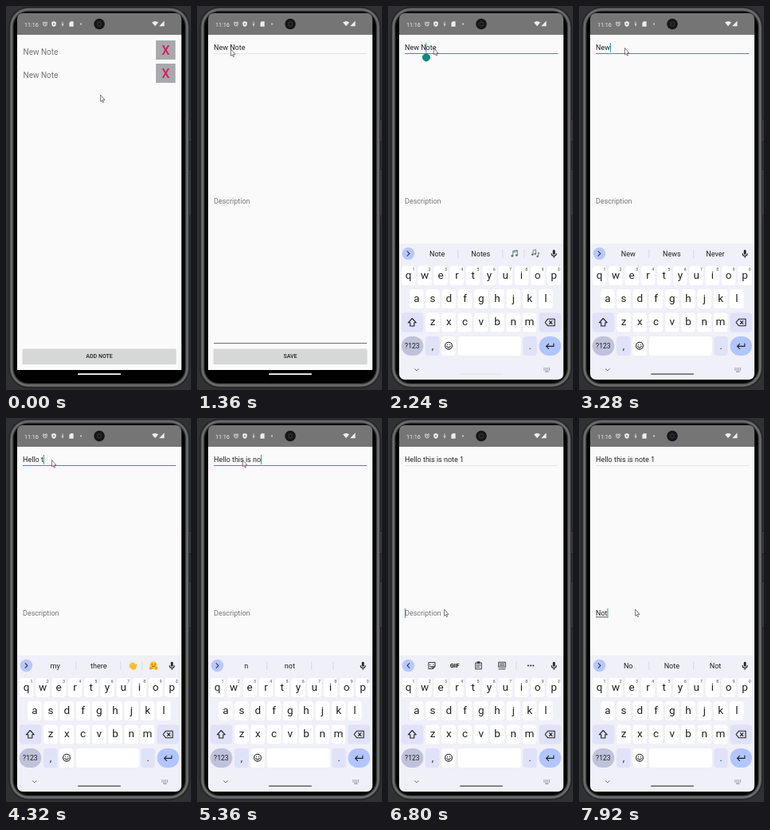
An HTML page with a canvas that plays this animation: 232 by 480 pixels, repeating every 8 s.

```html
<!DOCTYPE html>
<html lang="en">
<head>
<meta charset="utf-8">
<title>Notes app</title>
<style>
  html, body { margin: 0; width: 100%; height: 100%; overflow: hidden; background: #303135; }
  canvas { display: block; width: 232px; height: 480px; }
</style>
</head>
<body>
<canvas id="stage"></canvas>
<script>
const LOOP = 8000, STEP = 80;
const TEAL = '#0c8a7e', LINE_TEAL = '#2c9f94', INK = '#202124', SOFT = '#dfe2f8', PANEL = '#eff0f8';
const canvas = document.getElementById('stage');
const ctx = canvas.getContext('2d');
const ratio = window.devicePixelRatio || 1;
canvas.width = 232 * ratio;
canvas.height = 480 * ratio;

// ---- Timelines ----
const MUSIC = ['Note', 'Notes', 'notes', 'beamed'];
const edits = [
  // time, field, text, suggestions (none = toolbar)
  [0, 'title', 'New Note', MUSIC],
  [2720, 'title', 'New Not', ['Not', 'Note', 'Notes']],
  [2800, 'title', 'New No', ['No', 'Not', 'Note']],
  [2880, 'title', 'New N', ['N', 'Not', 'No']],
  [2960, 'title', 'New ', ['Year', 'York', 'one']],
  [3040, 'title', 'New', ['New', 'News', 'Never']],
  [3440, 'title', 'Ne', ['Ne', 'New', 'Need']],
  [3520, 'title', 'N', ['N', 'No', 'Not']],
  [3920, 'title', '', null],
  [4000, 'title', 'He', ['He', 'Hey', 'Her']],
  [4160, 'title', 'Hell', ['Hell', 'Hello', 'Help']],
  [4240, 'title', 'Hello', ['Hello', 'Hello', 'wave', 'hug']],
  [4320, 'title', 'Hello t', ['my', 'there', 'wave', 'hug']],
  [4400, 'title', 'Hello th', ['th', 'there', 'the']],
  [4480, 'title', 'Hello thi', ['thi', 'this', 'thing']],
  [4800, 'title', 'Hello this', ['this', 'thus', 'thistle']],
  [5040, 'title', 'Hello this i', ['I', 'is', 'it']],
  [5120, 'title', 'Hello this is', ['is', 'isn\'t', 'island']],
  [5360, 'title', 'Hello this is no', ['n', 'not', '', '']],
  [5520, 'title', 'Hello this is not', ['not', 'note', 'nothing']],
  [5600, 'title', 'Hello this is note', ['note', 'notes', 'noted']],
  [5680, 'title', 'Hello this is note ', ['that', 'to', 'for']],
  [5920, 'title', 'Hello this is note 1', ['1', '1st', '10']],
  [6640, 'body', '', null],
  [7760, 'body', 'N', ['N', 'No', 'Not']],
  [7840, 'body', 'No', ['No', 'Not', 'Now']],
  [7920, 'body', 'Not', ['No', 'Note', 'Not']]
];
const pointerMoves = [
  // start, end, target x, target y
  [0, 0, 118, 111],
  [0, 480, 42, 54],
  [1440, 1600, 49, 53],
  [1920, 2240, 57, 52.5],
  [6240, 6720, 70, 239]
];
const within = (t, from, to) => t >= from && t < to;
const progress = (t, from, to) => Math.min(1, Math.max(0, (t - from) / (to - from || 1)));
const smooth = p => p * p * (3 - 2 * p);

// ---- Drawing helpers ----
function rect(x, y, w, h, color, r = 0) {
  ctx.fillStyle = color;
  ctx.beginPath();
  ctx.roundRect(x, y, w, h, r);
  ctx.fill();
}
function disc(x, y, r, color) {
  ctx.fillStyle = color;
  ctx.beginPath();
  ctx.arc(x, y, r, 0, 7);
  ctx.fill();
}
function label(text, x, y, size, color, align = 'left', weight = 400) {
  ctx.font = `${weight} ${size}px Roboto, sans-serif`;
  ctx.textAlign = align;
  ctx.fillStyle = color;
  ctx.fillText(text, x, y);
}
// Path data is relative to (x, y).
function icon(d, x, y, { stroke, fill, width = 1 }) {
  const path = new Path2D(d);
  ctx.save();
  ctx.translate(x, y);
  ctx.lineWidth = width;
  ctx.lineCap = ctx.lineJoin = 'round';
  if (fill) { ctx.fillStyle = fill; ctx.fill(path); }
  if (stroke) { ctx.strokeStyle = stroke; ctx.stroke(path); }
  ctx.restore();
}
function textWidth(text, size) {
  ctx.font = `400 ${size}px Roboto, sans-serif`;
  return ctx.measureText(text).width;
}
const ring = r => `M${-r} 0a${r} ${r} 0 1 0 ${2 * r} 0a${r} ${r} 0 1 0 ${-2 * r} 0`;

// ---- Phone ----
function drawPhone() {
  rect(0, 0, 232, 480, '#303135');
  [[141, 29], [204, 59]].forEach(([y, h]) => {
    rect(229, y, 3, h, '#1c1d1e', 1);
    rect(230.2, y + 1, 1, h - 2, '#77797b');
  });
  // Nested outlines from the outer edge of the rim to the glass.
  const rim = ['#1b1c1d', '#3c3d3e', '#5b5c5d', '#737475', '#666768', '#4a4b4c', '#1e1f20', '#030303'];
  rim.forEach((color, i) => {
    const inset = 3.5 + i * .9;
    rect(inset, inset - 2.5, 234 - 2 * inset, 483.5 - 2 * inset, color, 25 - i);
  });
}
function drawStatusBar() {
  const white = '#ededed';
  rect(14, 9, 206, 27, '#757575');
  label('11:16', 23, 25.5, 7.2, white);
  icon(ring(2.3) + 'M0 -1.2V0L.8 .6M-2.9 -1.8L-1.8 -2.8M2.9 -1.8L1.8 -2.8', 49, 22.7, { stroke: white, width: .8 });
  icon('M0 -3.4L2.8 -2.3V.2Q2.8 2.4 0 3.5Q-2.8 2.4 -2.8 .2V-2.3Z', 60, 22.5, { fill: white });
  disc(60, 22.5, 1, '#757575');
  icon('M0 -2.6V2.6M-1.2 .2L0 1.4L1.2 .2', 71, 22.5, { stroke: white, width: .8 });
  icon('M-1 -3.2H2.6V3.2H-2.6V-1.6Z', 82, 22.5, { fill: white });
  disc(94, 22.5, .9, white);
  icon('M-4 -1.6Q0 -4.6 4 -1.6L0 3.3Z', 187, 22, { fill: white });
  icon('M3 -3.4V3.2H-3.4Z', 195.5, 22, { fill: white });
  disc(117, 22.5, 6.8, '#151617');
  disc(117, 22.5, 3.2, '#2b2d31');
  disc(117, 22.5, 1.6, '#101114');
}
const drawNavPill = color => rect(90, 459.2, 54, 1.9, color, 1);
function drawButton(text) {
  rect(20.5, 428.5, 193, 19.5, '#d6d7d7', 1.5);
  label(text, 117, 440, 7, INK, 'center', 500);
}

// ---- App screens ----
function drawList() {
  [43, 72].forEach(y => {
    label('New Note', 21.5, y + 18, 10, '#757575');
    rect(188, y, 24.5, 24, '#a8a9ac');
    label('X', 200.3, y + 18, 16, '#d81b60', 'center', 500);
  });
  drawButton('ADD NOTE');
}
function drawCaret(x, y) {
  rect(x, y, 1, 12, LINE_TEAL);
}
function drawEditor(t, field, text) {
  const title = field === 'title' ? text : 'Hello this is note 1';
  const titleFocus = t >= 1760 && field === 'title';
  label(title, 21, 55, 9, INK);
  rect(21, 59, 192, titleFocus ? 1 : .8, titleFocus ? LINE_TEAL : '#dedede');
  if (within(t, 2000, 2640)) {
    drawCaret(47.3, 46);
    icon('M0 -5.6L3.8 -2.8A4.9 4.9 0 1 1 -3.8 -2.8Z', 48, 64, { fill: TEAL });
  } else if (titleFocus && t >= 2640) {
    drawCaret(21 + textWidth(title, 9), 46);
  }
  if (field === 'body' && text) {
    const width = textWidth(text, 9);
    label(text, 21, 247, 9, INK);
    rect(21, 248.5, width, .7, INK);
    drawCaret(21 + width, 238);
  } else {
    label('Description', 21, 247, 9, '#757575');
    if (field === 'body' && t < 7520) drawCaret(21, 238);
  }
  rect(21, 421, 192, 1, '#707070');
  drawButton('SAVE');
}

// ---- Keyboard ----
const NOTE_COLOR = '#5f7480';
const emoji = {
  notes: x => {
    icon('M-2.2 2.6V-3.4L3.2 -4.2V1.8M-2.2 -2L3.2 -2.8', x, 309.5, { stroke: NOTE_COLOR, width: .9 });
    disc(x - 3.2, 312.4, 1.4, NOTE_COLOR);
    disc(x + 2.2, 311.6, 1.4, NOTE_COLOR);
  },
  beamed: x => {
    icon('M-3 1V-4.2L.4 -4.8V.2M3.4 3.4V-1.4L5 -.4', x, 309.5, { stroke: NOTE_COLOR, width: .9 });
    disc(x - 3.9, 310.8, 1.2, NOTE_COLOR);
    disc(x - .5, 310, 1.2, NOTE_COLOR);
    disc(x + 2.5, 313, 1.2, NOTE_COLOR);
  },
  wave: x => {
    icon('M-3.4 -2L0 1.5M-1.6 -3.8L1.6 -.4M.8 -3.6L3 -.8M-3.8 .6L-.5 3M4.2 -1.6L3.4 2', x, 310, { stroke: '#f8bd25', width: 1.8 });
    disc(x + 1, 311.5, 3.2, '#f8bd25');
  },
  hug: x => {
    disc(x, 309, 4.7, '#fcc934');
    icon('M-2.5 -1.2q.7 -1 1.4 0M1.1 -1.2q.7 -1 1.4 0M-2 .8Q0 3 2 .8', x, 309, { stroke: '#6a431b', width: .8 });
    disc(x - 3.3, 312.7, 2, '#f3a02b');
    disc(x + 3.3, 312.7, 2, '#f3a02b');
  }
};
function drawToolbar() {
  const line = { stroke: '#3c4043', width: 1.1 };
  icon('M-4 -4H4V1L1 4H-4ZM1 4V1H4M-2 -1.5V-1M2 -1.5V-1M-2 1Q-1 2 0 1.2', 55, 309.5, line);
  label('GIF', 83.5, 312.2, 7.5, INK, 'center', 800);
  icon('M-3.7 -3.5H3.7V4.3H-3.7ZM-1.3 -4.6H1.3V-2.8H-1.3ZM-2 -.5H2M-2 1.8H1', 113.5, 309.5, line);
  icon('M-4.3 -4.3H4.3V1.8H-4.3ZM-2.5 -2.2H2.5M-2.5 -.2H2.5M-4 4.3H4', 143, 309.5, line);
  rect(160.5, 304, .8, 11, '#cfd1dc');
  [-3.2, 0, 3.2].forEach(dx => disc(179 + dx, 309.5, 1, INK));
}
function drawSuggestions(words) {
  icon(words ? 'M-1.4 -2.8L1.4 0L-1.4 2.8' : 'M1.4 -2.8L-1.4 0L1.4 2.8', 25.5, 309.5, { stroke: '#263c78', width: 1.1 });
  if (!words) return drawToolbar();
  const centers = words.length > 3 ? [61.7, 116.3, 159, 185] : [61.7, 116.3, 171];
  const dividers = words.length > 3 ? [88, 144, 171] : [88, 144];
  dividers.forEach(x => rect(x - .6, 304, .8, 11, '#d3d5df'));
  words.forEach((word, i) => {
    if (i > 1 && emoji[word]) emoji[word](centers[i]);
    else label(word, centers[i], 312.5, 9, INK, 'center');
  });
}
function drawKeyRow(letters, firstX, y, upper) {
  [...letters].forEach((letter, i) => {
    const x = firstX + i * 20.25;
    rect(x - 8.7, y, 17.4, 24, '#fff', 3.5);
    label(upper ? letter.toUpperCase() : letter, x, y + 15.6, 13.5, INK, 'center');
    if (letters.length === 10) label((i + 1) % 10, x + 6.4, y + 6, 5.3, '#44474f', 'center');
  });
}
function drawKeyboard(t, words) {
  const upper = within(t, 3920, 4000) || within(t, 7520, 7760);
  const line = { stroke: INK, width: 1.1 };
  rect(14, 297, 206, 170, PANEL);
  disc(25.5, 309.5, 7.8, '#b9c8fb');
  drawSuggestions(words);
  rect(206.7, 304.8, 2.8, 6, INK, 1.4);
  icon('M-3 0A3 3 0 0 0 3 0M0 3V5', 208.1, 309.5, line);

  drawKeyRow('qwertyuiop', 25.7, 325, upper);
  drawKeyRow('asdfghjkl', 35.8, 354, upper);
  drawKeyRow('zxcvbnm', 56, 383.5, upper);
  rect(16.8, 383.5, 27.5, 24, SOFT, 3.5);
  icon('M0 -5L5 .3H2.5V4.5H-2.5V.3H-5Z', 30.3, 395.5, { ...line, fill: upper ? INK : null });
  rect(189.5, 383.5, 27.5, 24, SOFT, 3.5);
  icon('M-6 0L-2.5 -4.3H6V4.3H-2.5ZM-.7 -1.8L2.9 1.8M2.9 -1.8L-.7 1.8', 203, 395.5, line);

  rect(16.8, 413, 27.5, 24, '#bfc2da', 12);
  label('?123', 30.4, 428, 8.6, INK, 'center');
  rect(47, 413, 17.6, 24, SOFT, 3.5);
  label(',', 56, 428.5, 12, INK, 'center');
  rect(67.3, 413, 17.4, 24, '#fff', 3.5);
  icon(ring(4.4) + 'M-2.3 1Q0 3.6 2.3 1M-1.6 -1.3V-1.1M1.6 -1.3V-1.1', 76, 424.7, line);
  rect(88, 413, 78.7, 24, '#fff', 3.5);
  rect(169.3, 413, 17.4, 24, SOFT, 3.5);
  label('.', 178, 428.5, 12, INK, 'center');
  rect(189.5, 413, 27.5, 24, '#b1c5ff', 12);
  icon('M4.8 -3V.4H-4.5M-1.6 -2.6L-4.6 .4L-1.6 3.4', 203, 425, line);

  icon('M-2.3 -1.1L0 1.2L2.3 -1.1', 35.8, 454.7, { stroke: '#55575d', width: .9 });
  for (let row = 0; row < 2; row++)
    for (let col = 0; col < 4; col++) rect(195.3 + col * 2.2, 452.3 + row * 2, 1.1, 1.1, '#777980');
  rect(197, 456.5, 4.4, 1, '#777980');
  const shade = Math.round(232 - 114 * smooth(progress(t, 2240, 2960)));
  drawNavPill(`rgb(${shade},${shade},${shade + 3})`);
}

// ---- Pointer ----
function drawPointer(t) {
  let x = 0, y = 0;
  for (const [from, to, toX, toY] of pointerMoves) {
    if (t < from) break;
    const p = smooth(progress(t, from, to)) || +(from === to);
    x += (toX - x) * p;
    y += (toY - y) * p;
  }
  icon('M.5 .5V8.4L2.2 6.9L3.4 9.6L4.6 9.1L3.4 6.4H5.6Z', x, y, { fill: '#fff', stroke: '#4a4a4a', width: .7 });
}

function draw(t) {
  const [, field, text, words] = edits.findLast(edit => edit[0] <= t);
  ctx.setTransform(ratio, 0, 0, ratio, 0, 0);
  drawPhone();
  ctx.save();
  ctx.beginPath();
  ctx.roundRect(14, 9, 206, 458, 7);
  ctx.clip();
  rect(14, 36, 206, 419, '#fafafa');
  drawStatusBar();
  rect(14, 455, 206, 12, '#000');
  drawNavPill('#fff');
  if (t < 1360) drawList();
  else drawEditor(t, field, text);
  if (t >= 2000) {
    const left = 1 - progress(t, 1920, 2240);
    ctx.save();
    ctx.translate(0, 170 * left * left);
    drawKeyboard(t, words);
    ctx.restore();
  }
  drawPointer(t);
  ctx.restore();
}

const start = performance.now();
function tick() {
  const t = (performance.now() - start) % LOOP;
  draw(Math.floor(t / STEP) * STEP);
  requestAnimationFrame(tick);
}
tick();
</script>
</body>
</html>
```
